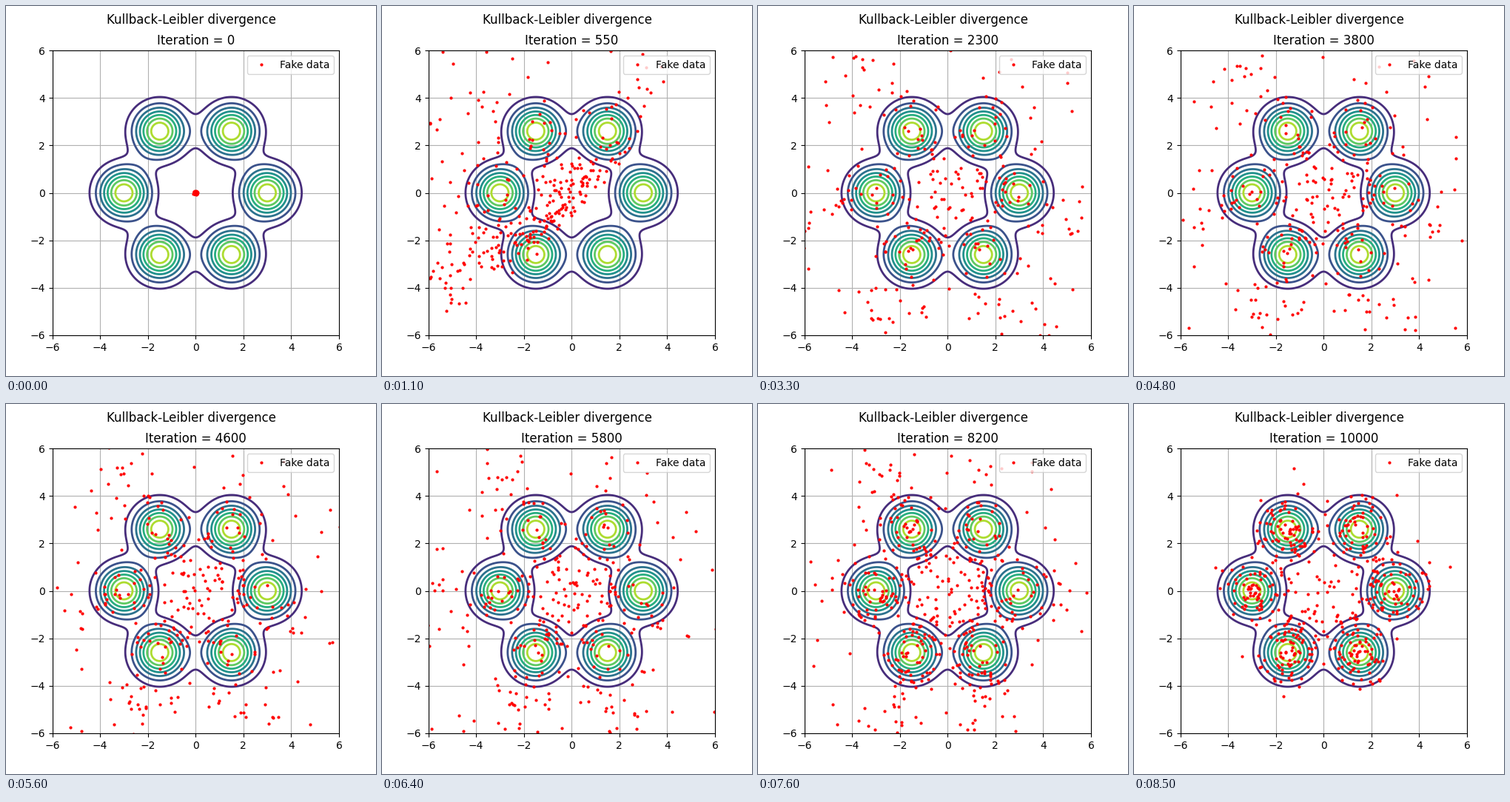
Recreate the animation shown at these times as a matplotlib script. Size 500 by 500 pixels, loop 8600 ms.

```python
import numpy as np
import matplotlib.pyplot as plt
from matplotlib.animation import FuncAnimation

FRAMES, INTERVAL = 86, 100
N = 500
rng = np.random.default_rng(12)

# Six Gaussian modes on a circle of radius 3
angles = np.arange(6) * np.pi / 3
modes = 3 * np.column_stack([np.cos(angles), np.sin(angles)])


def density(x, y):
    return sum(np.exp(-(x - cx) ** 2 - (y - cy) ** 2) / np.pi for cx, cy in modes)


def make_anchors():
    """Resting places: most points on a mode, the rest strung between modes."""
    k = rng.choice(6, N, p=[0.16, 0.13, 0.2, 0.17, 0.2, 0.14])
    pts = modes[k] + rng.normal(0, 0.58, (N, 2))
    loose = rng.random(N) < 0.28
    other = (k + rng.choice([1, 2, 3, 5], N)) % 6
    t = rng.uniform(0.15, 0.85, (N, 1))
    strings = modes[k] * (1 - t) + modes[other] * t + rng.normal(0, 0.25, (N, 2))
    pts[loose] = strings[loose]
    return pts


anchors = make_anchors()
spread = rng.normal(size=N)
noise = rng.normal(0, 0.25, N)
seeds = rng.normal(0, 0.025, (N, 2))
phase = rng.uniform(0, 2 * np.pi, (N, 2))
speed = rng.uniform(0.6, 1.4, (N, 2)) / 260

# Median and width of the radial stretch over the training run
KEYS = [0, 2300, 3800, 5800, 8200, 10000]
MEDIAN = np.log([2.3, 2.2, 2.05, 1.8, 1.2, 1.0])
WIDTH = [0.8, 0.8, 0.8, 0.75, 0.42, 0.15]


def smooth(t):
    t = np.clip(t, 0, 1)
    return t * t * (3 - 2 * t)


def scattered(it):
    stretch = np.exp(np.interp(it, KEYS, MEDIAN) + np.interp(it, KEYS, WIDTH) * spread)
    # The cloud is taller than wide and leans to the lower left until the end
    skew = np.interp(it, [2000, 5800, 8200, 10000], [0, 1, 1, 0])
    scale = 1 + skew * np.array([-0.14, 0.06])
    return anchors * stretch[:, None] * scale - skew * np.array([0.2, 0.15])


def folded(pts):
    """Fold the cloud into a band along the diagonal, open to the upper left."""
    a = (pts[:, 0] + pts[:, 1]) / np.sqrt(2) * 0.9 - 1.1
    b = (pts[:, 1] - pts[:, 0]) / np.sqrt(2)
    b = 0.12 * b ** 2 + 0.02 * a ** 2 + noise * (1 + 0.2 * abs(a)) - 0.25
    return np.column_stack([a - b, a + b]) / np.sqrt(2)


def positions(it):
    pts = scattered(it)
    mix = smooth((it - 550) / 1500)
    pts = folded(pts) * (1 - mix) + pts * mix
    calm = np.interp(it, [0, 8000, 10000], [0.16, 0.16, 0.06])
    pts = pts + calm * np.sin(it * speed + phase)
    return seeds + pts * min(1, it / 550) ** 1.3


def iteration(frame):
    return int(round(np.interp(frame, [0, 20, 60, 85], [0, 1000, 5000, 10000])))


fig, ax = plt.subplots(figsize=(5, 5), dpi=100)
fig.suptitle("Kullback-Leibler divergence")
grid = np.linspace(-6, 6, 301)
X, Y = np.meshgrid(grid, grid)
ax.contour(X, Y, density(X, Y), levels=np.arange(9) * 0.04, linewidths=2)
dots, = ax.plot([], [], "r.", ms=4, label="Fake data")
ax.set(xlim=(-6, 6), ylim=(-6, 6))
ax.grid(True)
ax.legend(loc="upper right")
title = ax.set_title("Iteration = 0")


def update(frame):
    it = iteration(frame)
    dots.set_data(*positions(it).T)
    title.set_text(f"Iteration = {it}")
    return dots, title


anim = FuncAnimation(fig, update, frames=FRAMES, interval=INTERVAL,
                     init_func=lambda: update(0), repeat=True, repeat_delay=0)
plt.show()
```
